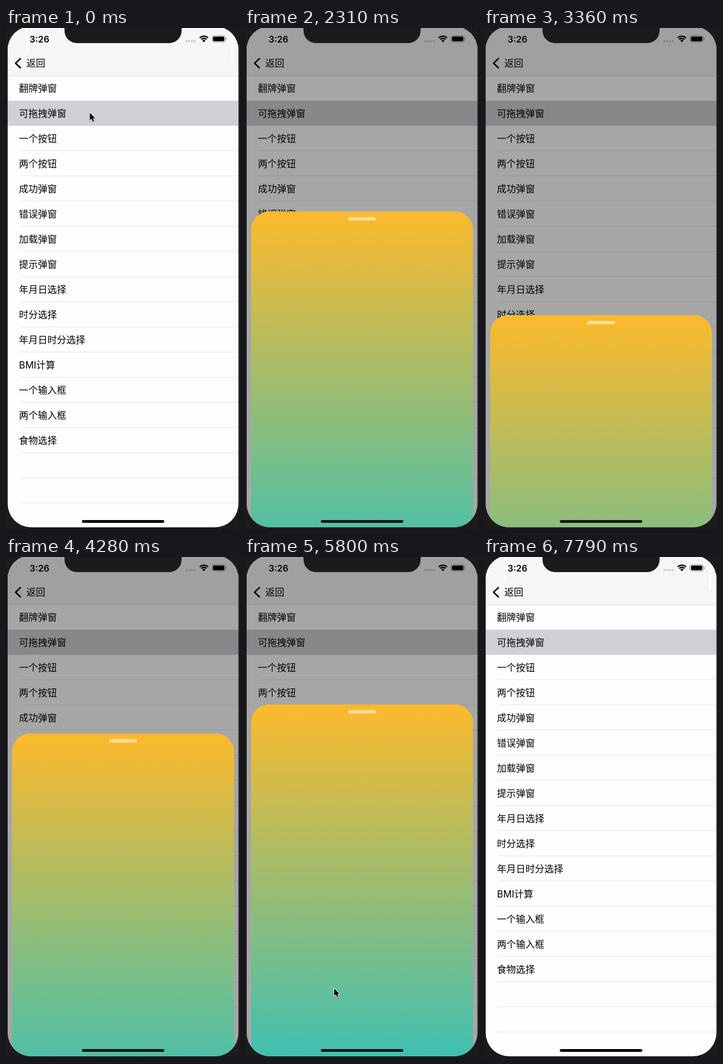
Animation of 418x896 px, one loop 8.11 s. Source, as an HTML page with a canvas:

```html
<!DOCTYPE html>
<html lang="zh-CN">
<head>
<meta charset="utf-8">
<title>可拖拽弹窗</title>
<style>
  html, body { margin: 0; width: 100%; height: 100%; overflow: hidden; background: #1b1b1b; }
  canvas { display: block; width: 418px; height: 896px; }
</style>
</head>
<body>
<canvas id="stage" width="418" height="896"></canvas>
<script>
const ctx = document.getElementById('stage').getContext('2d');
const LOOP = 8110, STEP = 60;
const REST = 264, HIDDEN = 896, SHADE = 0.35;
const FONT = 'Inter, "Noto Sans CJK SC", "Noto Sans CJK", sans-serif';
const ROWS = ['翻牌弹窗', '可拖拽弹窗', '一个按钮', '两个按钮', '成功弹窗', '错误弹窗',
  '加载弹窗', '提示弹窗', '年月日选择', '时分选择', '年月日时分选择', 'BMI计算',
  '一个输入框', '两个输入框', '食物选择'];

// Each drag pulls the sheet down by `pull` px in `hold` ms, then it springs back.
const OPEN = 900, CLOSE = 6860;
const DRAGS = [
  { at: 1950, hold: 200, pull: 164, lead: 0 },
  { at: 3120, hold: 300, pull: 276, lead: 0 },
  { at: 4170, hold: 200, pull: 150, lead: 20 },
  { at: 5050, hold: 250, pull: 250, lead: 61 }
];

const clamp = v => Math.max(0, Math.min(1, v));
const since = (t, start) => Math.floor((t - start) / STEP) * STEP;

// Share of the way still to go for a spring with damping ratio 0.9.
function springLeft(ms, speed) {
  const x = speed * ms / 1000, z = 0.9, d = Math.sqrt(1 - z * z);
  return Math.exp(-z * x) * (Math.cos(d * x) + z / d * Math.sin(d * x));
}

function closing(t) {
  const s = clamp(since(t, CLOSE) / 540);
  return s * s * (3 - 2 * s);
}

function sheetTop(t) {
  if (t < OPEN) return HIDDEN;
  if (t >= CLOSE) return REST + (HIDDEN - REST) * closing(t);
  const drag = DRAGS.filter(d => t >= d.at).pop();
  if (!drag) return REST + (HIDDEN - REST) * springLeft(since(t, OPEN), 7);
  const u = since(t, drag.at) + drag.lead;
  const share = u < drag.hold
    ? Math.sin(Math.PI / 2 * u / drag.hold) ** 2
    : springLeft(u - drag.hold, 12);
  return REST + drag.pull * share;
}

function shade(t) {
  if (t < OPEN) return 0;
  if (t < CLOSE) return SHADE * clamp(since(t, OPEN) / 200);
  return SHADE * (1 - closing(t));
}

function cursorAt(t) {
  if (t < 1500) return [150, 151];
  if (t >= 4750 && t < CLOSE) return [159.5, 771];
  if (t >= 7430 && t < 7790) {
    const s = clamp((since(t, 7670) + STEP) / 120);
    return [367 + 24 * s, 824 + 66 * s];
  }
  return null;
}

function box(x, y, w, h, fill) {
  ctx.fillStyle = fill;
  ctx.fillRect(x, y, w, h);
}

function round(x, y, w, h, r, fill) {
  ctx.fillStyle = fill;
  ctx.beginPath();
  ctx.roundRect(x, y, w, h, r);
  ctx.fill();
}

function text(str, x, y, font) {
  ctx.fillStyle = '#000';
  ctx.font = font + ' ' + FONT;
  ctx.fillText(str, x, y);
}

function glow(x, y, h, alpha) {
  const g = ctx.createLinearGradient(x - 3, 0, x + 3, 0);
  g.addColorStop(0, 'rgba(255,255,255,0)');
  g.addColorStop(0.5, `rgba(255,255,255,${alpha})`);
  g.addColorStop(1, 'rgba(255,255,255,0)');
  box(x - 3, y, 6, h, g);
}

function statusBar() {
  text('3:26', 42.3, 25.5, '600 16px');
  for (let i = 0; i < 4; i++) round(321.8 + i * 4.9, 21.5, 4, 4, 2, '#cbcbcd');

  ctx.strokeStyle = ctx.fillStyle = '#000';
  ctx.lineWidth = 2.3;
  const a = -Math.PI * 0.75, b = -Math.PI * 0.25;
  for (const r of [6.8, 10.7]) {
    ctx.beginPath();
    ctx.arc(355, 25.3, r, a, b);
    ctx.stroke();
  }
  ctx.beginPath();
  ctx.moveTo(355, 25.5);
  ctx.arc(355, 25.3, 4, a, b);
  ctx.fill();

  ctx.strokeStyle = '#a3a3a3';
  ctx.lineWidth = 1;
  ctx.beginPath();
  ctx.roundRect(369.5, 13.5, 24, 12, 3.5);
  ctx.stroke();
  round(371.3, 15.3, 20.4, 8.4, 2, '#000');
  round(394.5, 17.5, 1.5, 4, [0, 1.5, 1.5, 0], '#a3a3a3');
}

function page(dim) {
  box(0, 0, 418, 896, '#fefefe');
  box(0, 0, 418, 85, '#f6f6f6');
  const light = 1 - dim / SHADE;
  glow(38, 0, 45, 0.95 * light);
  glow(406, 10, 50, 0.95 * light);
  box(0, 85, 418, 1, '#dedede');
  box(0, 130, 418, 45, '#d1d0d5');
  for (let y = 219; y < 860; y += 45) box(24, y, 394, 1, '#e6e6e7');
  statusBar();

  ctx.strokeStyle = '#000';
  ctx.lineWidth = 2.6;
  ctx.lineCap = ctx.lineJoin = 'round';
  ctx.beginPath();
  ctx.moveTo(25.8, 54.8);
  ctx.lineTo(17.2, 63);
  ctx.lineTo(25.8, 71.2);
  ctx.stroke();
  ctx.lineCap = 'butt';

  text('返回', 36.5, 69, '400 17px');
  ROWS.forEach((row, i) => text(row, 23.3, 114 + i * 45, '400 17px'));
}

function sheet(top) {
  if (top >= 893) return;
  const g = ctx.createLinearGradient(0, top, 0, top + 632);
  g.addColorStop(0, '#fcba2d');
  g.addColorStop(1, '#3fc0b2');
  round(11, top, 398, 640, [32, 32, 0, 0], g);
  round(185, top + 10, 50, 6, 3, '#fbdc98');
}

function notch() {
  ctx.fillStyle = '#1b1b1b';
  ctx.beginPath();
  ctx.moveTo(100, -4);
  ctx.quadraticCurveTo(105, -3, 105, 3);
  ctx.arcTo(105, 27, 130, 27, 22);
  ctx.arcTo(315, 27, 315, 3, 22);
  ctx.lineTo(315, 3);
  ctx.quadraticCurveTo(315, -3, 320, -4);
  ctx.fill();
}

function cursor([x, y]) {
  ctx.save();
  ctx.translate(x, y);
  const tips = [[0.5, 0.5], [0.5, 14], [3.6, 11.2], [5.8, 16.2], [8, 15.2], [5.9, 10.4], [10, 10.4]];
  ctx.beginPath();
  for (const [px, py] of tips) ctx.lineTo(px, py);
  ctx.closePath();
  ctx.shadowColor = 'rgba(0,0,0,0.35)';
  ctx.shadowBlur = 2;
  ctx.shadowOffsetY = 1;
  ctx.strokeStyle = '#fff';
  ctx.lineWidth = 2;
  ctx.lineJoin = 'round';
  ctx.stroke();
  ctx.shadowColor = 'transparent';
  ctx.fillStyle = '#000';
  ctx.fill();
  ctx.restore();
}

function draw(t) {
  const dim = shade(t);
  box(0, 0, 418, 896, '#1b1b1b');
  ctx.save();
  ctx.beginPath();
  ctx.roundRect(3, -3, 414, 896, 42);
  ctx.clip();
  page(dim);
  box(0, 0, 418, 896, `rgba(0,0,0,${dim})`);
  sheet(sheetTop(t));
  round(136, 880, 148, 5, 2.5, dim > 0.1 ? '#161713' : '#000');
  ctx.restore();
  notch();
  const spot = cursorAt(t);
  if (spot) cursor(spot);
}

const begin = performance.now();
function tick() {
  draw((performance.now() - begin) % LOOP);
  requestAnimationFrame(tick);
}
tick();
</script>
</body>
</html>
```
